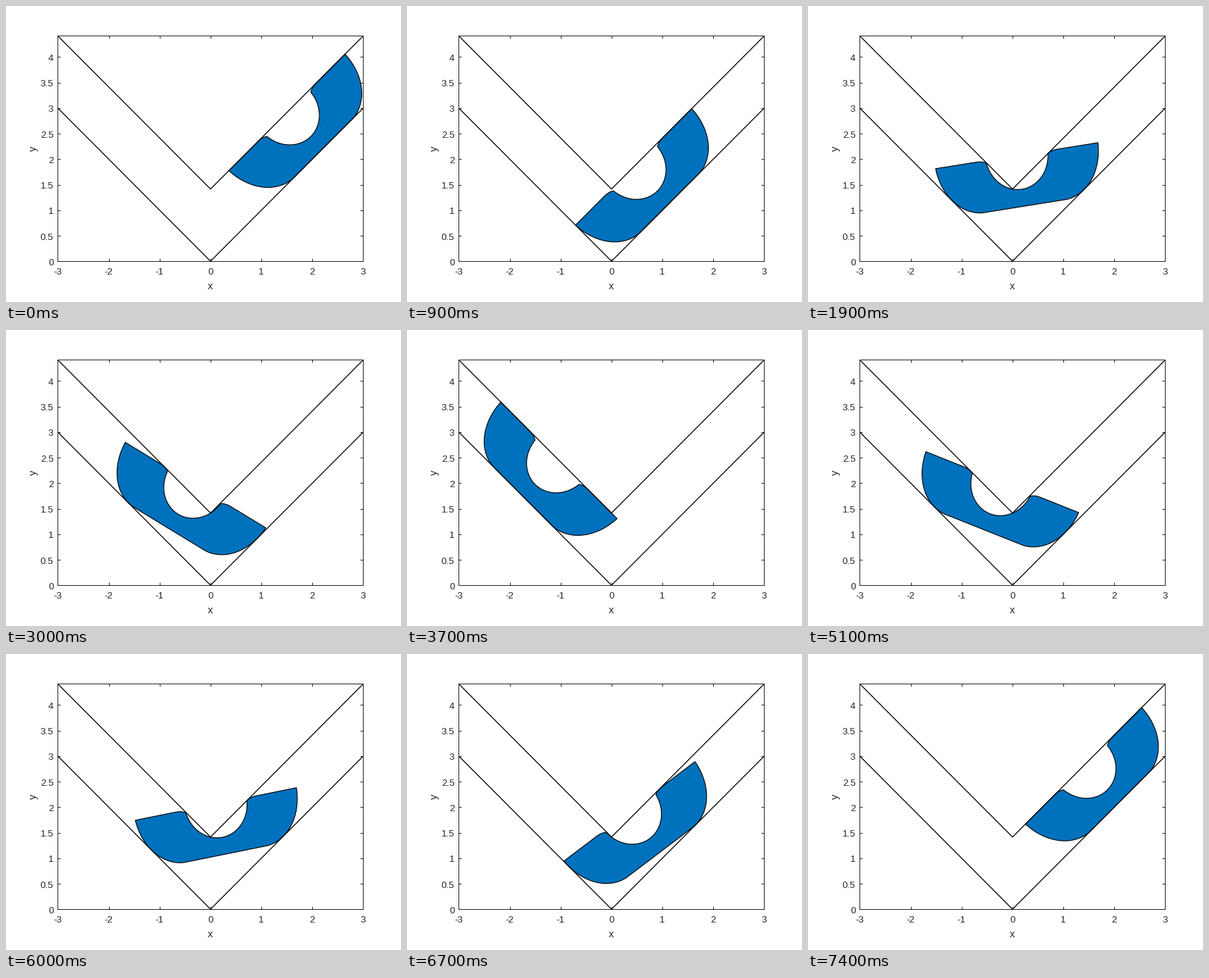
Recreate the animation shown at these times as a matplotlib script. Size 560x420 px, loop 7500 ms.

```python
import numpy as np
import matplotlib.pyplot as plt
from matplotlib.animation import FuncAnimation

W, H, DPI = 560, 420, 100
PX = 72 / DPI                     # one pixel in points
BLUE, INK = "#0072BD", "#262626"
LEFT, RIGHT, TOP, BOTTOM = 73.45, 506.45, 42.45, 362.15   # plot box in pixels
SLIDE = 1.51                      # travel along each arm
STEP, HOLD = 100, 4               # ms per tick, extra ticks on the first pose
TICKS = 75

# Optimal sofa for a unit-wide corridor: constants of the boundary arcs
A, B = 0.094426560843653, 1.399203727333547
PHI, THETA = 0.039177364790084, 0.681301509382725


def radius(t):
    """Radius of curvature of the outer arc at tangent angle t."""
    w = np.pi / 2 - t - PHI
    return np.select(
        [t < PHI, t < THETA, t < np.pi / 2 - THETA, t <= np.pi / 2 - PHI],
        [0.5, (1 + A + t - PHI) / 2, A + t - PHI,
         B - w * (1 + A) / 2 - w**2 / 4], 0.0)


def cumulative(f, t):
    return np.r_[0, np.cumsum((f[1:] + f[:-1]) / 2 * np.diff(t))]


ang = np.linspace(0, np.pi / 2, 2001)
sin, cos = np.sin(ang), np.cos(ang)
rad = radius(ang)
run = cumulative(rad * cos, ang)
arc = np.c_[run[-1] + run, 1 - cumulative(rad * sin, ang)]
normal, tangent = np.c_[sin, cos], np.c_[cos, -sin]
support = (arc * normal).sum(axis=1)


def sofa():
    """Closed outline, symmetric about x = 0, long side on y = 1."""
    mirror = np.array([-1, 1])
    nub = (arc - normal)[ang <= THETA]
    corner = (support - 1)[:, None] * normal - (support[::-1] - 1)[:, None] * tangent
    corner = corner[(ang >= PHI) & (ang <= np.pi / 2 - PHI)]
    half = np.vstack([arc[::8], arc[-1:], nub[::8]])
    return np.vstack([half, corner[::-8], half[::-1] * mirror])


BODY = sofa()
RIGHT_WALL = np.array([1, -1]) / np.sqrt(2)
LEFT_WALL = np.array([-1, -1]) / np.sqrt(2)


def place(q):
    """q in [-1, 0]: right arm, [0, 1]: turning, [1, 2]: left arm."""
    t = np.clip(q, 0, 1) * np.pi / 2
    n = np.array([-np.sin(t), np.cos(t)])
    u = np.array([np.cos(t), np.sin(t)])
    to_right = BODY @ n - np.interp(t, ang, support) - SLIDE * max(q - 1, 0)
    to_left = BODY @ u - np.interp(np.pi / 2 - t, ang, support) - SLIDE * max(-q, 0)
    return np.outer(to_right, RIGHT_WALL) + np.outer(to_left, LEFT_WALL)


KEY_T = [0, 4.53, 5.2, 29.75, 30.45, 35, 35.47, 40, 40.65, 65.15, 65.92, 70.45]
KEY_Q = [-1, 0, 0, 1, 1, 2, 2, 1, 1, 0, 0, -1]

plt.rcParams["font.family"] = "Liberation Sans"
fig = plt.figure(figsize=(W / DPI, H / DPI), dpi=DPI, facecolor="white")
y_max = 3 + np.sqrt(2)
ax = fig.add_axes([LEFT / W, 1 - BOTTOM / H, (RIGHT - LEFT) / W, (BOTTOM - TOP) / H])
ax.set(xlim=(-3, 3), ylim=(0, y_max))
xticks, yticks = np.arange(-3, 4), np.arange(0, 4.5, 0.5)
ax.set_xticks(xticks)
ax.set_yticks(yticks)
ax.tick_params(direction="in", top=True, right=True, length=4.4 * PX, width=PX,
               color=INK, labelbottom=False, labelleft=False)
for spine in ax.spines.values():
    spine.set(color=INK, linewidth=PX)


def label(x, y, s, size=13.33, **kw):
    fig.text(x / W, 1 - y / H, s, fontsize=size * PX, color=INK, **kw)


for v in xticks:
    label(LEFT + (v + 3) * (RIGHT - LEFT) / 6, 381, f"{v}",
          ha="center", va="baseline")
for v in yticks:
    label(67.5, BOTTOM - v * (BOTTOM - TOP) / y_max + 5.6, f"{v:g}",
          ha="right", va="baseline")
label((LEFT + RIGHT) / 2, 402, "x", 14.67, ha="center", va="baseline")
label(38.5, 202, "y", 14.67, ha="center", va="center", rotation=90)

body, = ax.fill(*place(-1).T, facecolor=BLUE, edgecolor="black",
                linewidth=1.15 * PX, joinstyle="round", zorder=2)
for base in (0, np.sqrt(2)):
    ax.plot([-3, 0, 3], [base + 3, base, base + 3], color="black",
            linewidth=1.3 * PX, solid_joinstyle="miter", zorder=2.2)


def update(tick):
    q = np.interp(max(tick - HOLD, 0), KEY_T, KEY_Q)
    body.set_xy(place(q))
    return body,


anim = FuncAnimation(fig, update, frames=TICKS, interval=STEP,
                     init_func=lambda: update(0), repeat=True, repeat_delay=0)
plt.show()
```
